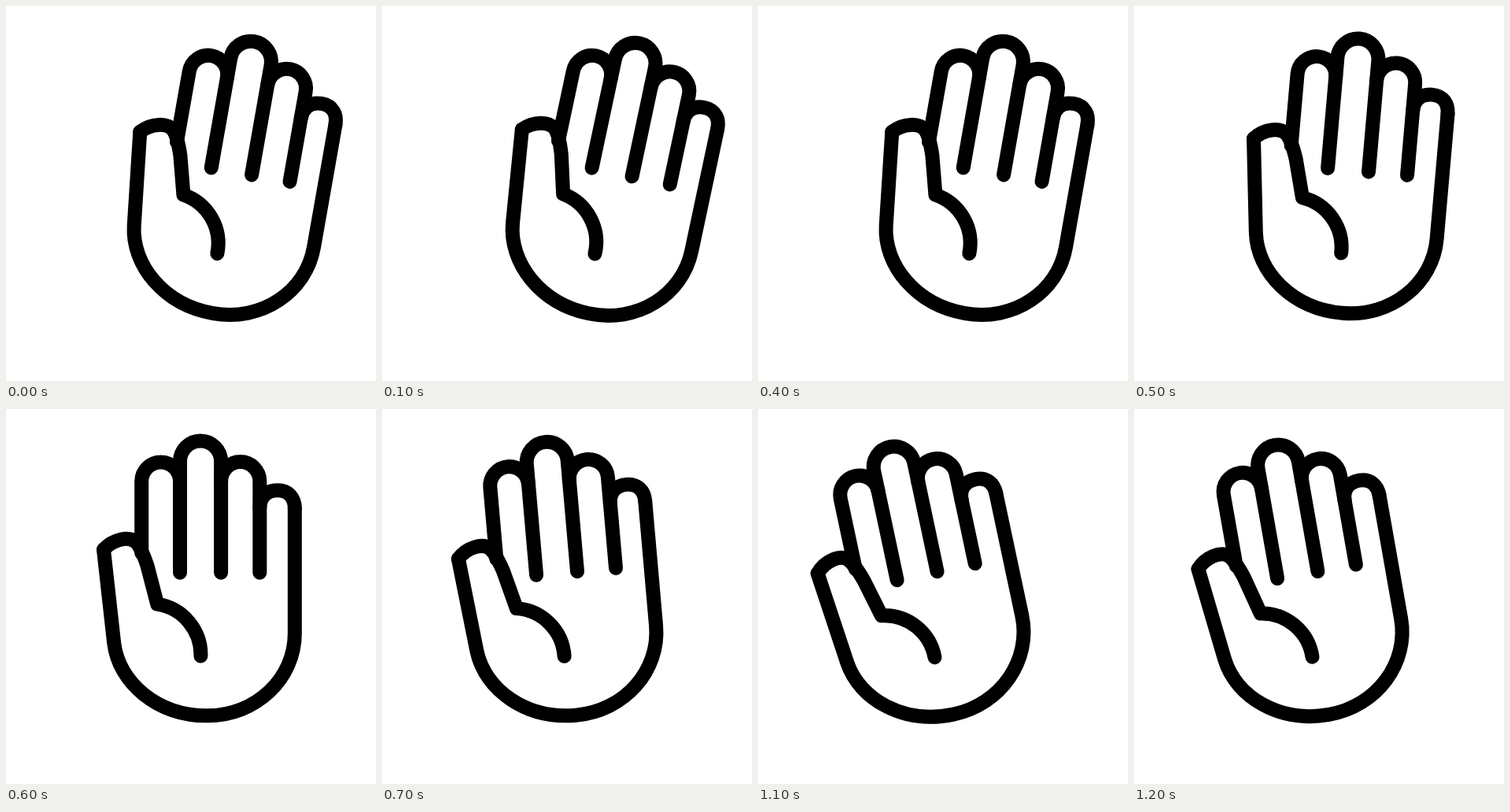
An HTML page that plays this animation: 470x476 px, repeating every 1.3 s.

```html
<!DOCTYPE html>
<html lang="en">
<head>
<meta charset="utf-8">
<title>Waving hand</title>
<style>
  html, body { margin: 0; width: 100%; height: 100%; overflow: hidden; background: #fff; }
  svg { display: block; width: 470px; height: 476px; }
</style>
</head>
<body>
<svg viewBox="0 0 470 476">
  <!-- Drawn upright, with the wrist pivot at 0,0 -->
  <g id="hand" fill="none" stroke="#000" stroke-width="18" stroke-linecap="round" stroke-linejoin="round">
    <!-- thumb, then the crease of the palm -->
    <path d="M-125-194.5C-113-208-93-212-84-204C-78-198-72.5-183-69.5-174L-56.8-125.3A65 65 0 0 1-1.6-59.5"/>
    <!-- palm -->
    <path d="M-125-194.5L-111.8-76C-106-26-57 16.3 6.5 16.3C69 16.3 117.8-31 117.8-88V-247"/>
    <!-- index, middle, ring and little finger -->
    <path d="M-76.8-190V-281.1A24.4 24.4 0 0 1-28-281.1"/>
    <path d="M-28-165.3V-306.5A26 26 0 0 1 24.1-306.5V-165.3"/>
    <path d="M24.1-281.3A24.6 24.6 0 0 1 73.3-281.3V-165.3"/>
    <path d="M73.3-247C73.3-262 82-269.8 96-269.8S117.8-260 117.8-247"/>
  </g>
</svg>
<script>
  const STEP = 100;
  const STEPS = 13;
  const MIDDLE = 6;
  const PIVOT = { x: 249, y: 373 };
  const SWAY = 10.6;
  // Tilt in degrees by number of steps away from upright
  const TILT = [0, 5, 10, 12, 13, 12, 10];

  const hand = document.getElementById("hand");
  const start = performance.now();

  function draw(time) {
    const step = Math.floor(time / STEP) % STEPS;
    const offset = MIDDLE - step;
    const side = Math.sign(offset);
    const angle = side * TILT[Math.abs(offset)];
    const x = PIVOT.x + side * SWAY;
    hand.setAttribute("transform", `translate(${x} ${PIVOT.y}) rotate(${angle})`);
  }

  function tick(now) {
    draw(Math.max(0, now - start));
    requestAnimationFrame(tick);
  }

  draw(0);
  requestAnimationFrame(tick);
</script>
</body>
</html>
```
